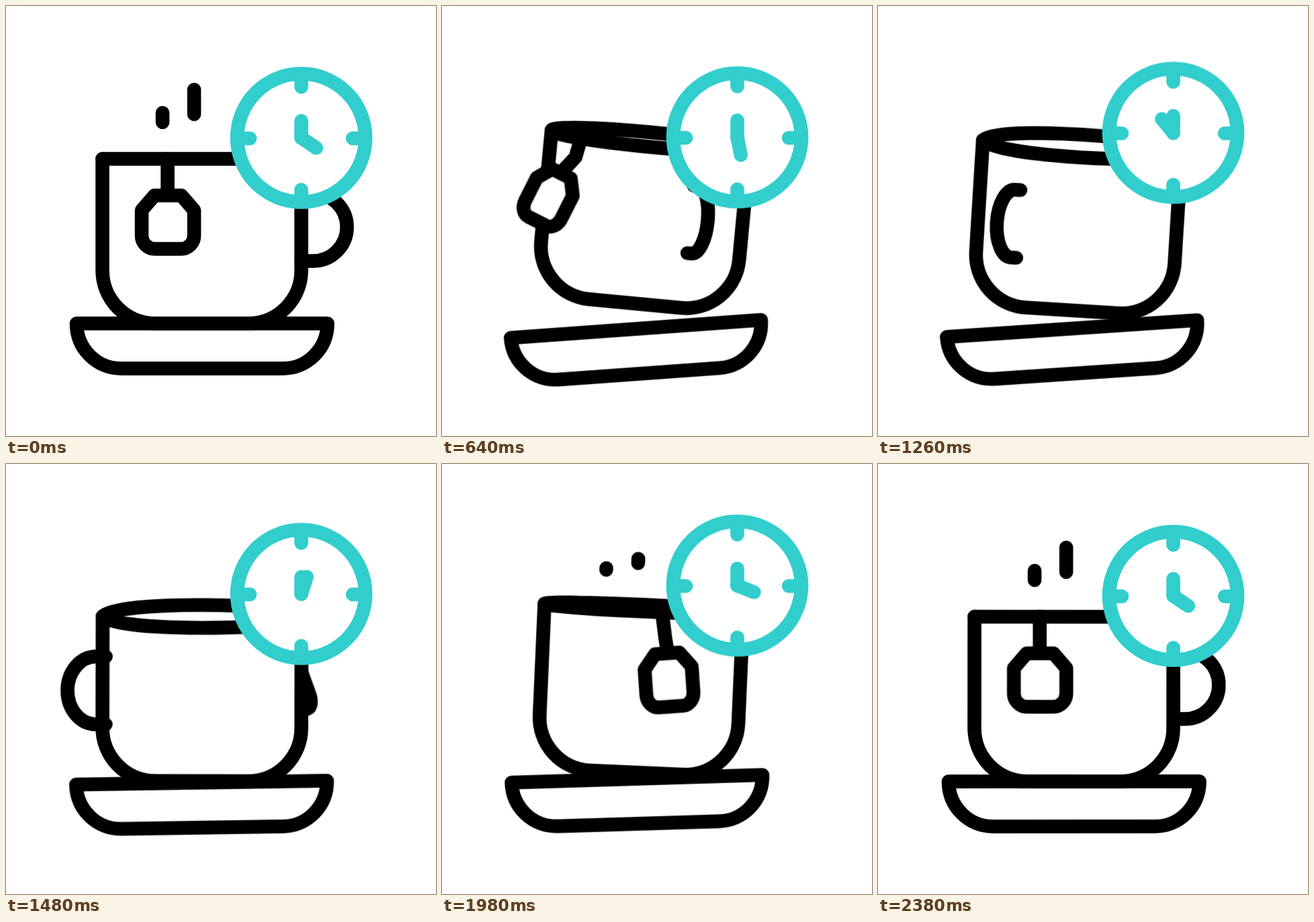
These frames come from a looping animation (640 px wide and 640 px high, 2400 ms). An HTML page:

```html
<!DOCTYPE html>
<html lang="en">
<head>
<meta charset="utf-8">
<title>Tea time</title>
<style>
  html, body { margin: 0; width: 100%; height: 100%; overflow: hidden; background: #fff; }
  svg { display: block; width: 100vw; height: 100vh; --smooth: cubic-bezier(.333, 0, .667, 1); }
  path, line, circle {
    fill: #fff; stroke: #000; stroke-width: 20.6;
    stroke-linecap: round; stroke-linejoin: round;
  }
  .open { fill: none; }
  .clock * { stroke: #32cdcd; }

  .saucer, .cup, .rim, .steam, .clock, .hour { animation: 2400ms var(--smooth) infinite; }
  .handle, .string, .bag { animation: 2400ms linear infinite; }
  .layer { animation: 2400ms step-end infinite; }
  .handle, .bag { vector-effect: non-scaling-stroke; }

  /* Clock */
  .clock { animation-name: bob; }
  .hour { animation-name: hour; transform-origin: 439.5px 196.3px; }
  @keyframes bob {
    0%, 25%, 58.333%, 91.667%, 100% { transform: translateY(0); }
    41.667%, 75% { transform: translateY(-27px); }
  }
  @keyframes hour {
    0%, 8.333% { transform: rotate(0deg); }
    91.667%, 100% { transform: rotate(360deg); }
  }

  /* Cup and saucer */
  .cup { animation-name: lift; transform-origin: 291.5px 472px; }
  .saucer { animation-name: tilt; transform-origin: 291.5px 472.5px; }
  .rim { animation-name: rim; }
  @keyframes lift {
    0%, 8.333%, 63.333%, 78.75%, 99.583%, 100% { transform: translate(0px, 0px) rotate(0deg); }
    39.167% { transform: translate(-6.2px, -46.2px) rotate(8.4deg); }
    89.167% { transform: translate(-6px, -44px) rotate(8.4deg); }
  }
  @keyframes tilt {
    0%, 8.333%, 66.667%, 78.75%, 99.583%, 100% { transform: translate(0px, 0px) rotate(0deg); }
    25%, 50% { transform: translate(-3.2px, 8.1px) rotate(-4.1deg); }
    89.167% { transform: translate(-5px, -13.5px) rotate(-5.8deg); }
  }
  @keyframes rim {
    0%, 8.333%, 89.167%, 100% {
      d: path("M143.5 227.5C143.5 227.5 210 227.5 291.5 227.5C373 227.5 439.5 227.5 439.5 227.5C439.5 227.5 373 227.5 291.5 227.5C210 227.5 143.5 227.5 143.5 227.5Z");
    }
    39.167%, 70.833% {
      d: path("M143.5 227.5C143.5 218 210 210.5 291.5 210.5C373 210.5 439.5 218 439.5 227.5C439.5 237 373 244.5 291.5 244.5C210 244.5 143.5 237 143.5 227.5Z");
    }
  }

  /* Steam is trimmed from below, then grows upwards again */
  .steam { animation-name: steam; stroke-dasharray: 1 3; }
  @keyframes steam {
    0%, 8.333% { stroke-dashoffset: 0; opacity: 1; }
    20.8% { stroke-dashoffset: -1; opacity: 1; }
    20.81% { stroke-dashoffset: 1; opacity: 0; }
    79.16% { stroke-dashoffset: 1; opacity: 0; }
    79.167% { stroke-dashoffset: 1; opacity: 1; }
    91.667%, 100% { stroke-dashoffset: 0; opacity: 1; }
  }

  /* Handle passes in front to the left and returns behind the cup */
  .handle { animation-name: handle; transform-origin: 439.5px 0; }
  .handle-front { animation-name: handle-front; }
  .handle-back { animation-name: handle-back; }
  @keyframes handle {
    0% { transform: translate(0px, 0px) scaleX(1); }
    8.333% { transform: translate(0px, 0px) scaleX(1); animation-timing-function: cubic-bezier(.4, 0, .75, .68); }
    26.667% { transform: translate(-77.5px, 11px) scaleX(.38); }
    40.833% { transform: translate(-158.5px, 20.5px) scaleX(-.1); }
    52.5% { transform: translate(-235.5px, 20px) scaleX(-.47); }
    62.5% { transform: translate(-296px, 8px) scaleX(-.87); }
    70.833% { transform: translate(-210px, 0px) scaleX(-.4); }
    82.5% { transform: translate(-70px, 0px) scaleX(.45); animation-timing-function: cubic-bezier(.25, .4, .6, 1); }
    100% { transform: translate(0px, 0px) scaleX(1); }
  }
  @keyframes handle-front { 0%, 100% { opacity: 1; } 62.5% { opacity: 0; } }
  @keyframes handle-back { 0%, 100% { opacity: 0; } 62.5% { opacity: 1; } }

  /* Tea bag swings out left, goes behind the cup and returns from the right */
  .bag { animation-name: bag; transform-origin: 241px 321.5px; }
  .string { animation-name: string; }
  .bag-front { animation-name: bag-front; }
  .bag-back { animation-name: bag-back; }
  @keyframes bag {
    0% { transform: translate(0px, 0px) rotate(0deg) scaleX(1); }
    8.333% { transform: translate(0px, 0px) rotate(0deg) scaleX(1); animation-timing-function: cubic-bezier(.4, 0, .8, .75); }
    26.667% { transform: translate(-91px, 5.5px) rotate(21.4deg) scaleX(.77); }
    30.833% { transform: translate(-117.5px, 15.5px) rotate(29deg) scaleX(.7); animation-timing-function: cubic-bezier(.3, .4, .6, 1); }
    35% { transform: translate(-163px, 25.5px) rotate(43deg) scaleX(.6); animation-timing-function: cubic-bezier(.4, 0, .7, .6); }
    40.833% { transform: translate(-123px, 18px) rotate(36.7deg) scaleX(.45); }
    45.833% { transform: translate(-51px, 8.5px) rotate(20deg) scaleX(.5); }
    61.667% { transform: translate(184px, 8.5px) rotate(-20deg) scaleX(.5); animation-timing-function: cubic-bezier(.3, .4, .6, 1); }
    66.667% { transform: translate(271px, 23.5px) rotate(-32deg) scaleX(.6); animation-timing-function: cubic-bezier(.4, 0, .7, .6); }
    70.833% { transform: translate(242px, 30.5px) rotate(-15.4deg) scaleX(.73); }
    82.5% { transform: translate(93px, 11px) rotate(-6.5deg) scaleX(.9); animation-timing-function: cubic-bezier(.2, .46, .6, 1); }
    100% { transform: translate(0px, 0px) rotate(0deg) scaleX(1); }
  }
  @keyframes string {
    0% { d: path("M240.5 227.5L240.5 255L240.5 282"); }
    8.333% { d: path("M240.5 227.5L240.5 255L240.5 282"); animation-timing-function: cubic-bezier(.4, 0, .8, .75); }
    26.667% { d: path("M187.5 240L183 264L165 287"); }
    30.833% { d: path("M160 234L156 262L143 301"); animation-timing-function: cubic-bezier(.3, .4, .6, 1); }
    35% { d: path("M143.5 230L132 275L105 318"); animation-timing-function: cubic-bezier(.4, 0, .7, .6); }
    40.833% { d: path("M155 228L150 270L142 308"); }
    45.833% { d: path("M200 228L198 260L200 292"); }
    61.667% { d: path("M400 228L405 260L412 292"); animation-timing-function: cubic-bezier(.3, .4, .6, 1); }
    66.667% { d: path("M439.5 228L455 275L491 311"); animation-timing-function: cubic-bezier(.4, 0, .7, .6); }
    70.833% { d: path("M443 230L449 290L470 312"); }
    82.5% { d: path("M320.5 240L325.5 269L329.5 289"); animation-timing-function: cubic-bezier(.2, .46, .6, 1); }
    100% { d: path("M240.5 227.5L240.5 255L240.5 282"); }
  }
  @keyframes bag-front { 0%, 66.667%, 100% { opacity: 1; } 35% { opacity: 0; } }
  @keyframes bag-back { 0%, 66.667%, 100% { opacity: 0; } 35% { opacity: 1; } }
</style>
</head>
<body>
<svg viewBox="0 0 640 640">
  <path class="saucer" d="M105 472.5H478.5A66 67 0 0 1 412.5 539.5H171A66 67 0 0 1 105 472.5Z"/>

  <g class="cup">
    <g class="layer handle-back">
      <path class="handle open" d="M439.5 379.5H457A50.5 50.5 0 0 0 457 278.5H439.5"/>
    </g>
    <g class="layer bag-back">
      <path class="string open" d="M240.5 227.5L240.5 255L240.5 282"/>
      <path class="bag" d="M221 282H261L280 304V342A19.5 19.5 0 0 1 260.5 361.5H221.5A19.5 19.5 0 0 1 202 342V304Z"/>
    </g>

    <path d="M143.5 227.5V393A79 79 0 0 0 222.5 472.5H360.5A79 79 0 0 0 439.5 393V227.5"/>
    <path class="rim" d="M143.5 227.5H439.5Z"/>

    <g class="layer handle-front">
      <path class="handle open" d="M439.5 379.5H457A50.5 50.5 0 0 0 457 278.5H439.5"/>
    </g>
    <g class="layer bag-front">
      <path class="string open" d="M240.5 227.5L240.5 255L240.5 282"/>
      <path class="bag" d="M221 282H261L280 304V342A19.5 19.5 0 0 1 260.5 361.5H221.5A19.5 19.5 0 0 1 202 342V304Z"/>
    </g>

    <path class="steam open" pathLength="1" d="M233 173V159"/>
    <path class="steam open" pathLength="1" d="M280 161V124.5"/>
  </g>

  <g class="clock">
    <circle cx="439.5" cy="196.3" r="95.5"/>
    <path class="open" d="M439.5 101V120.5M439.5 291.5V273.5M344 197H363M535 197H516M439.5 171V196.5"/>
    <line class="hour" x1="439.5" y1="196.3" x2="461.7" y2="211.2"/>
  </g>
</svg>
</body>
</html>
```
